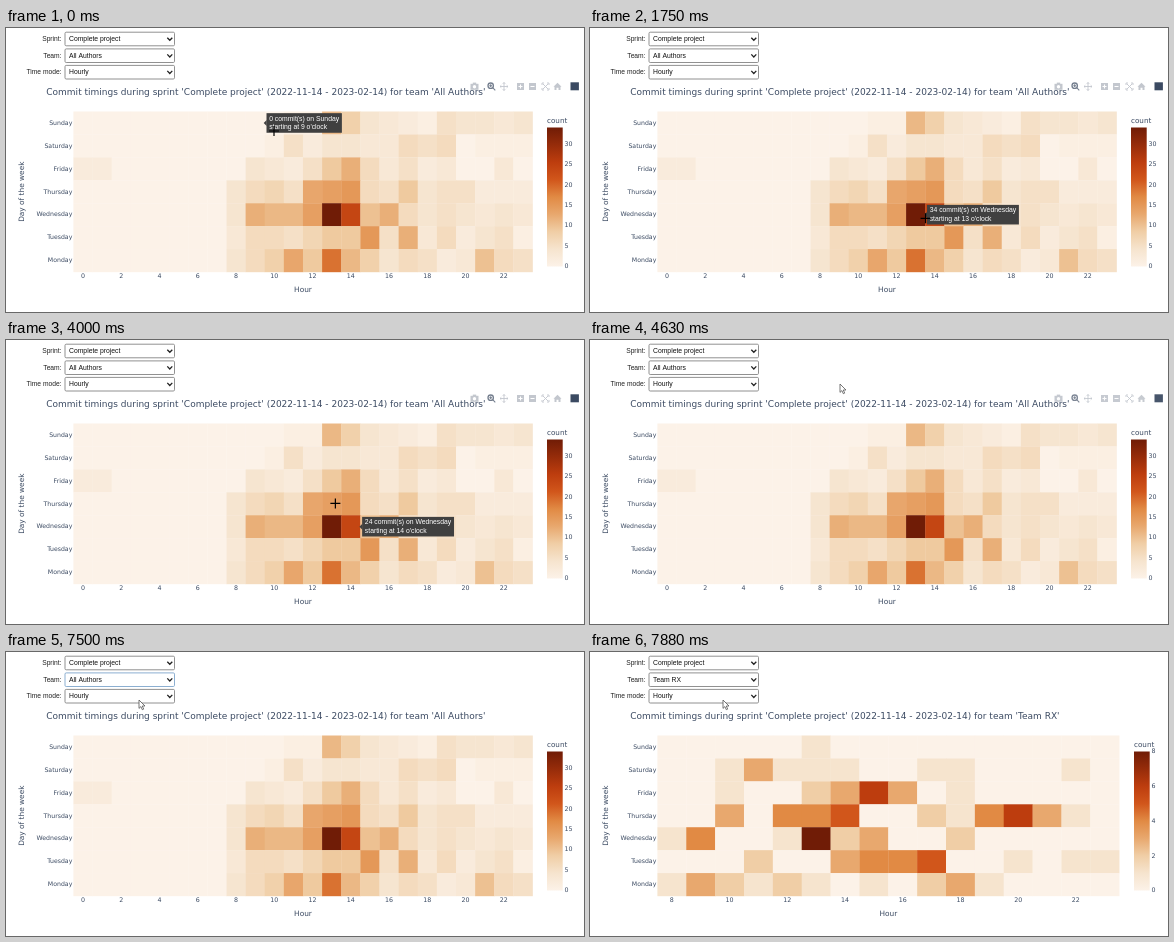
Recreate the animation shown at these times as an HTML page with a canvas. Size 578 by 284 pixels, loop 8 s.

```html
<!DOCTYPE html>
<html lang="en">
<head>
<meta charset="utf-8">
<title>Commit timings</title>
<style>
html, body { margin: 0; width: 100%; height: 100%; overflow: hidden; background: #fff; }
canvas { display: block; width: 578px; height: 284px; }
</style>
</head>
<body>
<canvas id="stage"></canvas>
<script>
const LOOP = 8000, STEP = 125, SWITCH = 7750;
const W = 578, H = 284;
const PLOT = { x: 67.4, y: 83.5, h: 160.5 };
const ROW = PLOT.h / 7;
const CHART_FONT = '"DejaVu Sans", sans-serif';
const PAGE_FONT = '"Liberation Sans", Arial, sans-serif';
const INK = '#3b4a62';
const DAYS = ['Sunday', 'Saturday', 'Friday', 'Thursday', 'Wednesday', 'Tuesday', 'Monday'];
const SCALE = [[252, 242, 232], [246, 228, 206], [240, 206, 166], [232, 168, 110], [225, 138, 68],
  [209, 86, 27], [189, 61, 14], [150, 44, 10], [112, 28, 6]];

// Commits per hour, from 8 to 23 o'clock
const everyone = [
  [0, 0, 0, 1, 1, 11, 8, 4, 3, 2, 1, 5, 4, 4, 3, 4],
  [0, 0, 1, 5, 2, 4, 4, 3, 3, 6, 5, 6, 0, 1, 1, 1],
  [0, 4, 3, 2, 5, 9, 12, 6, 3, 5, 2, 3, 0, 0, 3, 0],
  [4, 6, 7, 5, 13, 14, 15, 6, 5, 9, 4, 5, 5, 2, 2, 2],
  [4, 12, 11, 11, 14, 34, 24, 10, 12, 6, 4, 5, 4, 3, 4, 3],
  [3, 6, 6, 5, 7, 9, 9, 15, 5, 12, 3, 6, 2, 4, 5, 1],
  [4, 6, 8, 13, 9, 19, 11, 8, 4, 6, 5, 2, 3, 10, 6, 5],
].map(row => [...Array(8).fill(0), ...row]);
everyone[2][0] = everyone[2][1] = 2;

const oneTeam = [
  '0000010000000000', '0013111001100010', '0010023630100000', '0030445002146310',
  '1400182300200000', '0002003445001011', '1321210102310000',
].map(row => [...row].map(Number));

const CHARTS = {
  all: { team: 'All Authors', data: everyone, first: 0, cell: 19.13, max: 34, tick: 5, barX: 541, hourX: 297 },
  one: { team: 'Team RX', data: oneTeam, first: 8, cell: 28.86, max: 8, tick: 2, barX: 544, hourX: 298.3 },
};

// Pointer path: time, x, y
const PATH = [[-125, 254, 98], [0, 268, 103], [625, 315, 187], [1000, 334, 190], [1625, 334, 190],
  [2250, 349, 193], [3750, 349, 193], [4625, 250, 44], [5500, 153, 28], [5750, 150, 30],
  [6125, 144, 33], [6500, 140, 25], [6750, 140, 26], [7375, 133, 47], [7500, 133, 48], [8000, 133, 48]];

const canvas = document.getElementById('stage');
const ctx = canvas.getContext('2d');
const ratio = window.devicePixelRatio || 1;
canvas.width = W * ratio;
canvas.height = H * ratio;

function colorAt(f) {
  const p = Math.min(Math.max(f, 0), 1) * (SCALE.length - 1);
  const i = Math.min(Math.floor(p), SCALE.length - 2);
  return `rgb(${SCALE[i].map((c, k) => Math.round(c + (SCALE[i + 1][k] - c) * (p - i)))})`;
}

function pointerAt(t) {
  const i = Math.max(1, PATH.findIndex(key => key[0] >= t));
  const [t0, x0, y0] = PATH[i - 1], [t1, x1, y1] = PATH[i];
  const u = (t - t0) / (t1 - t0), e = u * u * (3 - 2 * u);
  return { x: x0 + (x1 - x0) * e, y: y0 + (y1 - y0) * e };
}

function rect(x, y, w, h, fill) {
  ctx.fillStyle = fill;
  ctx.fillRect(x, y, w, h);
}

function text(str, x, y, size, align = 'left', color = INK, font = CHART_FONT) {
  ctx.font = `${size}px ${font}`;
  ctx.textAlign = align;
  ctx.textBaseline = 'middle';
  ctx.fillStyle = color;
  ctx.fillText(str, x, y);
}

function stroke(path, color, width) {
  ctx.strokeStyle = color;
  ctx.lineWidth = width;
  ctx.stroke(new Path2D(path));
}

function select(label, value, y, focused) {
  text(label, 55.5, y, 6.7, 'right', '#222', PAGE_FONT);
  ctx.beginPath();
  ctx.roundRect(59, y - 6.8, 109.5, 13.6, 1.2);
  ctx.strokeStyle = focused ? '#7fa6cc' : '#858585';
  ctx.lineWidth = 0.9;
  ctx.stroke();
  text(value, 63, y + 0.2, 6.8, 'left', '#111', PAGE_FONT);
  stroke(`M161.3 ${y - 1.3}l2.5 2.6l2.5 -2.6`, '#222', 1.3);
}

function heatmap({ team, data, first, cell, max, tick, barX, hourX }) {
  text(`Commit timings during sprint 'Complete project' (2022-11-14 - 2023-02-14) for team '${team}'`,
    40.3, 64.5, 9);
  data.forEach((row, r) => {
    const y = PLOT.y + r * ROW;
    row.forEach((n, c) => rect(PLOT.x + c * cell, y, cell + 0.3, ROW + 0.2, colorAt(n / max)));
    text(DAYS[r], 66.3, y + ROW / 2 + 0.2, 6.2, 'right');
  });
  for (let hour = first; hour < 24; hour += 2)
    text(hour, PLOT.x + (hour - first + 0.5) * cell, 248.5, 6.3, 'center');
  text('Hour', hourX, 262.5, 7.4, 'center');

  ctx.save();
  ctx.translate(16.5, 163.7);
  ctx.rotate(-Math.PI / 2);
  text('Day of the week', 0, 0, 7.4, 'center');
  ctx.restore();

  const top = 99.5, height = 139;
  const gradient = ctx.createLinearGradient(0, top + height, 0, top);
  SCALE.forEach((_, i) => gradient.addColorStop(i / 8, colorAt(i / 8)));
  rect(barX, top, 15.7, height, gradient);
  text('count', barX, 92.8, 7.2);
  for (let n = 0; n <= max; n += tick)
    text(n, barX + 17.6, top + height * (1 - n / max) + 0.2, 6.3);
}

function modebar(alpha) {
  if (alpha <= 0) return;
  const light = '#c3c7ce', dark = '#747e8e';
  ctx.save();
  ctx.globalAlpha = alpha;
  rect(464.5, 55.8, 8, 6, light);
  rect(466.8, 54.6, 3.4, 1.5, light);
  ctx.beginPath();
  ctx.arc(468.5, 58.8, 1.7, 0, 7);
  ctx.fillStyle = '#fff';
  ctx.fill();
  ctx.beginPath();
  ctx.arc(484.7, 57.7, 2.7, 0, 7);
  ctx.strokeStyle = dark;
  ctx.lineWidth = 1.3;
  ctx.stroke();
  stroke('M486.7 59.7l2.6 2.6M483.3 57.7h2.8M484.7 56.3v2.8', dark, 1.1);
  stroke('M494 58.5h8M498 54.5v8M496.8 55.8l1.2-1.3l1.2 1.3M496.8 61.2l1.2 1.3l1.2-1.3'
    + 'M495.3 57.3l-1.3 1.2l1.3 1.2M500.7 57.3l1.3 1.2l-1.3 1.2', light, 0.9);
  for (const x of [511, 523]) rect(x, 55, 7, 7, light);
  stroke('M512.5 58.5h4M514.5 56.5v4M524.5 58.5h4', '#fff', 1.1);
  stroke('M536 57v-2h2M541 55h2v2M543 60v2h-2M538 62h-2v-2M537 56l5 5M542 56l-5 5', light, 0.9);
  ctx.fillStyle = light;
  ctx.fill(new Path2D('M547.5 58.7l4-4l4 4h-1v3.3h-2v-2.2h-2v2.2h-2v-3.3z'));
  rect(564.5, 54.3, 8.4, 8, '#3b4a62');
  ctx.restore();
}

function inPlot({ x, y }) {
  return x >= PLOT.x && x < PLOT.x + 459 && y >= PLOT.y && y < PLOT.y + PLOT.h;
}

function tooltip(point, { data, cell }) {
  const hour = Math.floor((point.x - PLOT.x) / cell);
  const day = Math.floor((point.y - PLOT.y) / ROW);
  const edge = PLOT.x + (hour + 1) * cell, mid = PLOT.y + (day + 0.5) * ROW;
  const lines = [`${data[day][hour]} commit(s) on ${DAYS[day]}`, `starting at ${hour} o'clock`];
  ctx.font = `6.8px ${PAGE_FONT}`;
  const width = Math.max(...lines.map(line => ctx.measureText(line).width)) + 5.5;
  rect(edge + 1.8, mid - 9.8, width, 19.6, '#404040');
  ctx.fill(new Path2D(`M${edge - 1} ${mid}l3-3v6z`));
  lines.forEach((line, i) => text(line, edge + 4.5, mid - 4.1 + i * 8.6, 6.8, 'left', '#fff', PAGE_FONT));
}

function pointer({ x, y }, cross) {
  if (cross) {
    stroke(`M${x - 5} ${y}h10M${x} ${y - 5}v10`, '#000', 1.2);
    return;
  }
  const arrow = new Path2D(`M${x} ${y}v8.4l1.9-1.8l1.4 3.1l1.4-.6l-1.4-3.1h2.7z`);
  ctx.fillStyle = '#fff';
  ctx.fill(arrow);
  ctx.strokeStyle = '#555';
  ctx.lineWidth = 0.8;
  ctx.stroke(arrow);
}

function draw(time) {
  const t = Math.floor(time % LOOP / STEP) * STEP;
  const chart = t < SWITCH ? CHARTS.all : CHARTS.one;
  ctx.setTransform(ratio, 0, 0, ratio, 0, 0);
  rect(0, 0, W, H, '#fff');
  select('Sprint:', 'Complete project', 11, false);
  select('Team:', chart.team, 27.7, t >= 6625 && t < SWITCH);
  select('Time mode:', 'Hourly', 44.2, false);
  heatmap(chart);
  modebar(Math.min(1, (5000 - t) / 400));

  // The label trails the pointer by one step
  const hovered = pointerAt(t - STEP), point = pointerAt(t);
  if (inPlot(hovered) && inPlot(point)) tooltip(hovered, chart);
  pointer(point, inPlot(point));
}

const start = performance.now();
function tick() {
  draw(performance.now() - start);
  requestAnimationFrame(tick);
}
tick();
</script>
</body>
</html>
```
